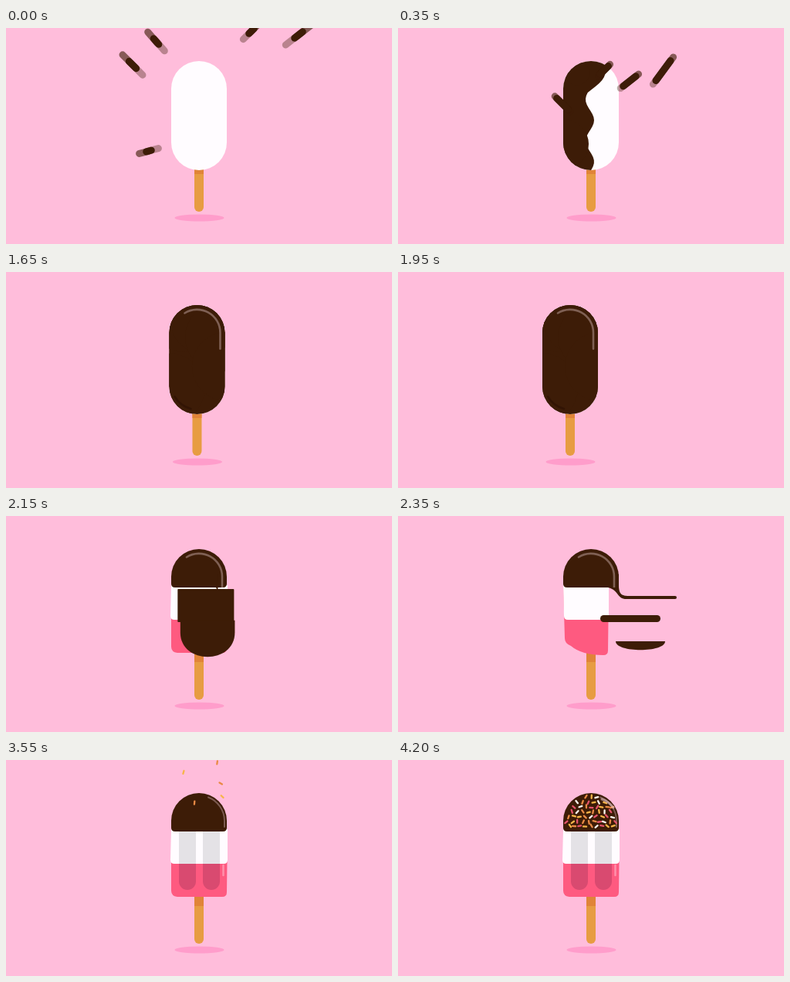
An HTML page for the animation above (4250 ms loop, 500 by 281 pixels).

```html
<!DOCTYPE html>
<html lang="en">
<head>
<meta charset="utf-8">
<title>Ice lolly</title>
<style>
html, body { margin: 0; width: 100%; height: 100%; overflow: hidden; background: #ffbddb; }
svg { display: block; width: 100%; height: 100%; }
</style>
</head>
<body>
<svg viewBox="0 0 500 281" fill="none" stroke-linecap="round">
  <defs>
    <clipPath id="pillClip"><rect x="214" y="43" width="72" height="142" rx="36"/></clipPath>
    <clipPath id="domeClip"><path d="M214 79a36 36 0 0 1 72 0V88q0 5-5 5H219q-5 0-5-5Z"/></clipPath>
    <clipPath id="grooveClip"><rect id="grooveWindow" x="214" y="93" width="72" height="0"/></clipPath>
    <clipPath id="whiteClip"><path d="M214 88H286V130q0 5-5 5H219q-5 0-5-5Z"/></clipPath>
  </defs>
  <rect width="500" height="281" fill="#ffbddb"/>
  <g id="lolly">
    <ellipse cx="250.500" cy="247" rx="32" ry="4.500" fill="#ff9dcb"/>
    <path d="M244 175H256V233a6 6 0 0 1-12 0Z" fill="#e79c42"/>
    <path d="M244 175H256V190H244Z" fill="#e08438"/>

    <g id="plain" clip-path="url(#pillClip)">
      <rect x="214" y="43" width="72" height="142" fill="#fffcff"/>
      <g id="coat" fill="#3d1c07"><path id="wave"/></g>
      <path id="shade" d="M221 162Q228 174 242 178" stroke="#321404" stroke-width="2.500"/>
    </g>

    <g id="layered">
      <path id="pink" fill="#fe5a80"/>
      <path id="white" fill="#fffcff"/>
      <g clip-path="url(#grooveClip)">
        <g id="grooves" fill="#d94a70"></g>
        <g id="paleGrooves" fill="#e4e2e6" clip-path="url(#whiteClip)"></g>
      </g>
      <path id="pinkShine" d="M281.500 137V150" stroke="#ff91ab" stroke-width="2.500"/>
      <g fill="#3d1c07">
        <path d="M214 79a36 36 0 0 1 72 0V88q0 5-5 5H219q-5 0-5-5Z"/>
        <path id="tail" d="M286 75V90C286 103 291 104 300 104H359a2 2 0 0 1 0 4H296C283 108 287 97 272 93Z"/>
        <rect id="slab"/>
        <path id="scoop"/>
      </g>
    </g>

    <path id="glint" d="M280 100V79A30 30 0 0 0 234 53.500" pathLength="1" stroke="#8b6d62" stroke-width="2.600"/>
    <path id="spark" d="M280 100V79A30 30 0 0 0 234 53.500" pathLength="1" stroke="#d5c6c0" stroke-width="3.600"/>
    <g id="domeShine" stroke="#7b5a50" stroke-width="2">
      <path d="M262 48.500A33 33 0 0 1 283 79V87"/>
    </g>
  </g>
  <g id="drops" stroke="#3d1c07" stroke-width="9"></g>
  <g id="sprinkles" stroke-width="2.300"></g>
  <path id="topShine" d="M264 51Q273 54 279 62" stroke="#f3cdd2" stroke-opacity=".55" stroke-width="3"/>
</svg>
<script>
const LOOP = 4250, STEP = 50;
const $ = id => document.getElementById(id);
const clamp = v => Math.max(0, Math.min(1, v));
const span = (t, a, b) => clamp((t - a) / (b - a));
const mix = (a, b, u) => a + (b - a) * u;
const smooth = u => u * u * (3 - 2 * u);
const easeOut = u => 1 - (1 - u) * (1 - u);

function set(el, attrs) {
  for (const key in attrs) el.setAttribute(key, attrs[key]);
}
function add(parent, tag, attrs = {}) {
  const el = document.createElementNS('http://www.w3.org/2000/svg', tag);
  set(el, attrs);
  return parent.appendChild(el);
}
function show(el, visible) {
  el.style.display = visible ? '' : 'none';
}
let seed = 7;
function random() {
  seed = (seed * 16807) % 2147483647;
  return seed / 2147483647;
}

for (const id of ['grooves', 'paleGrooves'])
  for (const x of [224, 255]) add($(id), 'rect', { x, y: 70, width: 22, height: 99, rx: 11 });

// Position at a given time, velocity per ms, half length vector, landing time
const drops = [
  { x: 164, y: 48, at: 0, vx: .14, vy: .145, hx: 8.5, hy: 8.5, land: 390 },
  { x: 194.5, y: 17.5, at: 0, vx: .15, vy: .165, hx: 6, hy: 7, land: 250 },
  { x: 318, y: 4, at: 0, vx: -.145, vy: .145, hx: 6, hy: -6, land: 400 },
  { x: 379, y: 9, at: 0, vx: -.226, vy: .172, hx: 9.5, hy: -7.5, land: 440 },
  { x: 185, y: 160, at: 0, vx: .2, vy: -.06, hx: 6, hy: -1.5, land: 150 },
  { x: 343.5, y: 55.5, at: 350, vx: -.22, vy: .27, hx: 11, hy: -15, land: 600 }
].map(d => {
  d.group = add($('drops'), 'g');
  d.parts = [.36, .62, 1].map(opacity => add(d.group, 'path', { 'stroke-opacity': opacity }));
  d.splat = add($('coat'), 'circle');
  return d;
});

const capsule = (x, y, hx, hy) => `M${x - hx} ${y - hy}L${x + hx} ${y + hy}`;

function drawDrops(t) {
  const blur = mix(1, .3, span(t, 0, 350));
  for (const d of drops) {
    const dt = Math.min(t, d.land) - d.at;
    const x = d.x + d.vx * dt, y = d.y + d.vy * dt;
    show(d.group, t < d.land);
    const lag = 32 * blur, keep = 1 - .45 * blur;
    set(d.parts[0], { d: capsule(x + d.vx * lag, y + d.vy * lag, d.hx, d.hy) });
    set(d.parts[1], { d: capsule(x - d.vx * lag, y - d.vy * lag, d.hx, d.hy) });
    set(d.parts[2], { d: capsule(x, y, d.hx * keep, d.hy * keep) });
    set(d.splat, { cx: x, cy: y, r: Math.max(0, Math.min(45, (t - d.land) * .16)) });
  }
}

function drawCoat(t) {
  const base = t < 350 ? mix(190, 248.5, span(t, 80, 350)) : mix(248.5, 302, span(t, 350, 720));
  let path = 'M205 40';
  for (let y = 40; y <= 188; y += 4) {
    const ripple = 5.5 * Math.cos((y - 120 - (t - 350) * .05) * Math.PI / 27);
    path += `L${base + ripple + Math.max(0, 84 - y) * .65} ${y}`;
  }
  set($('wave'), { d: path + 'L205 188Z' });
  show($('shade'), t >= 750);
}

function drawGlint(t) {
  const tip = smooth(span(t, 700, 980));
  show($('glint'), t > 700 && t < 2800);
  set($('glint'), {
    'stroke-dasharray': `${tip} 2`,
    opacity: .85 * (1 - span(t, 2400, 2750)),
    'clip-path': t >= 2150 ? 'url(#domeClip)' : 'none'
  });
  show($('spark'), t > 750 && t < 1100);
  set($('spark'), {
    'stroke-dasharray': '.12 2',
    'stroke-dashoffset': -Math.max(0, tip - .12),
    opacity: 1 - span(t, 980, 1100)
  });
}

function drawBody(t) {
  const k = t < 2350 ? span(t, 2150, 2350)
    : Math.exp(-(t - 2350) / 130) * Math.cos((t - 2350) / 55) * (1 - span(t, 2650, 2800));
  const right = 286 - 14 * k, left = 214 + 2 * k;
  const low = 178 - 11 * Math.max(0, k), deep = 178 + 3 * k;
  set($('pink'), {
    d: `M214 90H${right + 1}L${right} ${deep - 6}Q${right} ${deep} ${right - 6} ${deep}` +
       `Q${mix(240, 238, k)} ${deep} ${left + 8} ${low + 2 * k}Q${left} ${low - 1} ${left} ${low - 8}Z`
  });
  set($('white'), {
    d: `M214 90H${right + 1}V130q0 5-5 5H${left + 4}q-5 0-5-5Z`
  });
  set($('grooveWindow'), { height: 80 * smooth(span(t, 2800, 3150)) });
  set($('pinkShine'), { opacity: span(t, 2950, 3200) });
  set($('domeShine'), { opacity: span(t, 2850, 3200) });
}

function drawPeel(t) {
  const u = easeOut(span(t, 2130, 2350));
  const away = span(t, 2350, 2540);
  const stretch = t < 2350 ? u : t < 2420 ? mix(1, 1.2, span(t, 2350, 2420)) : 1.2 * (1 - smooth(span(t, 2420, 2620)));
  show($('tail'), stretch > 0);
  set($('tail'), { transform: `translate(272 0) scale(${stretch} 1) translate(-272 0)` });

  show($('slab'), away < 1);
  const slabHeight = mix(50, 9, u) * (1 - .6 * away);
  set($('slab'), {
    x: mix(214, 262, u) + 122 * away,
    y: mix(113, 133.5, u) - slabHeight / 2,
    width: mix(72, 78, u) * (1 - away),
    height: slabHeight,
    rx: 4.5 * u
  });

  show($('scoop'), away < 1);
  const x = mix(214, 282, u) + 100 * away, width = mix(72, 64, u) * (1 - away);
  const depth = mix(48, 15, u) * (1 - away), top = mix(130, 163, u), base = mix(149, 163, u);
  set($('scoop'), {
    d: `M${x} ${top}H${x + width}V${base}C${x + width} ${base + depth} ${x} ${base + depth} ${x} ${base}Z`
  });
}

const sprinkles = [];
const colours = ['#f6b548', '#e4536b', '#fff6ee', '#e4536b', '#f6b548', '#fff6ee', '#e98a45'];
for (let row = 0; row < 7; row++) {
  for (let col = -5; col <= 5; col++) {
    const x = 250 + col * 7 + (row % 2) * 3.5 + (random() - .5) * 2.4;
    const y = 48.5 + row * 6.3 + (random() - .5) * 2;
    const angle = random() * 180, land = 3540 + 340 * Math.sqrt(random());
    const inside = Math.hypot(x - 250, Math.min(0, y - 79)) < 32.5;
    if (!inside) continue;
    const el = add($('sprinkles'), 'path', { d: 'M-2 0H2', stroke: colours[Math.floor(random() * 7)] });
    sprinkles.push({ el, x, y, angle, land });
  }
}

function drawSprinkles(t) {
  for (const s of sprinkles) {
    const left = Math.max(0, s.land - t);
    const y = s.y - left * .56;
    show(s.el, t > 3340 && y > -5);
    set(s.el, { transform: `translate(${s.x + left * .02} ${y}) rotate(${s.angle + left * .9})` });
  }
  set($('topShine'), { opacity: span(t, 3900, 4100) });
}

function lollyShift(t) {
  if (t < 1990) return -27 * smooth(span(t, 1580, 1950));
  return -27 * (1 - smooth(span(t, 1990, 2150)));
}

function draw(t) {
  const peeled = t >= 2150;
  set($('lolly'), { transform: `translate(${lollyShift(t)} 0)` });
  show($('plain'), !peeled);
  show($('layered'), peeled);
  show($('domeShine'), peeled);
  drawDrops(t);
  drawCoat(t);
  drawGlint(t);
  drawBody(t);
  drawPeel(t);
  drawSprinkles(t);
}

const start = performance.now();
function tick() {
  const t = (performance.now() - start) % LOOP;
  draw(Math.floor(t / STEP) * STEP);
  requestAnimationFrame(tick);
}
tick();
</script>
</body>
</html>
```
